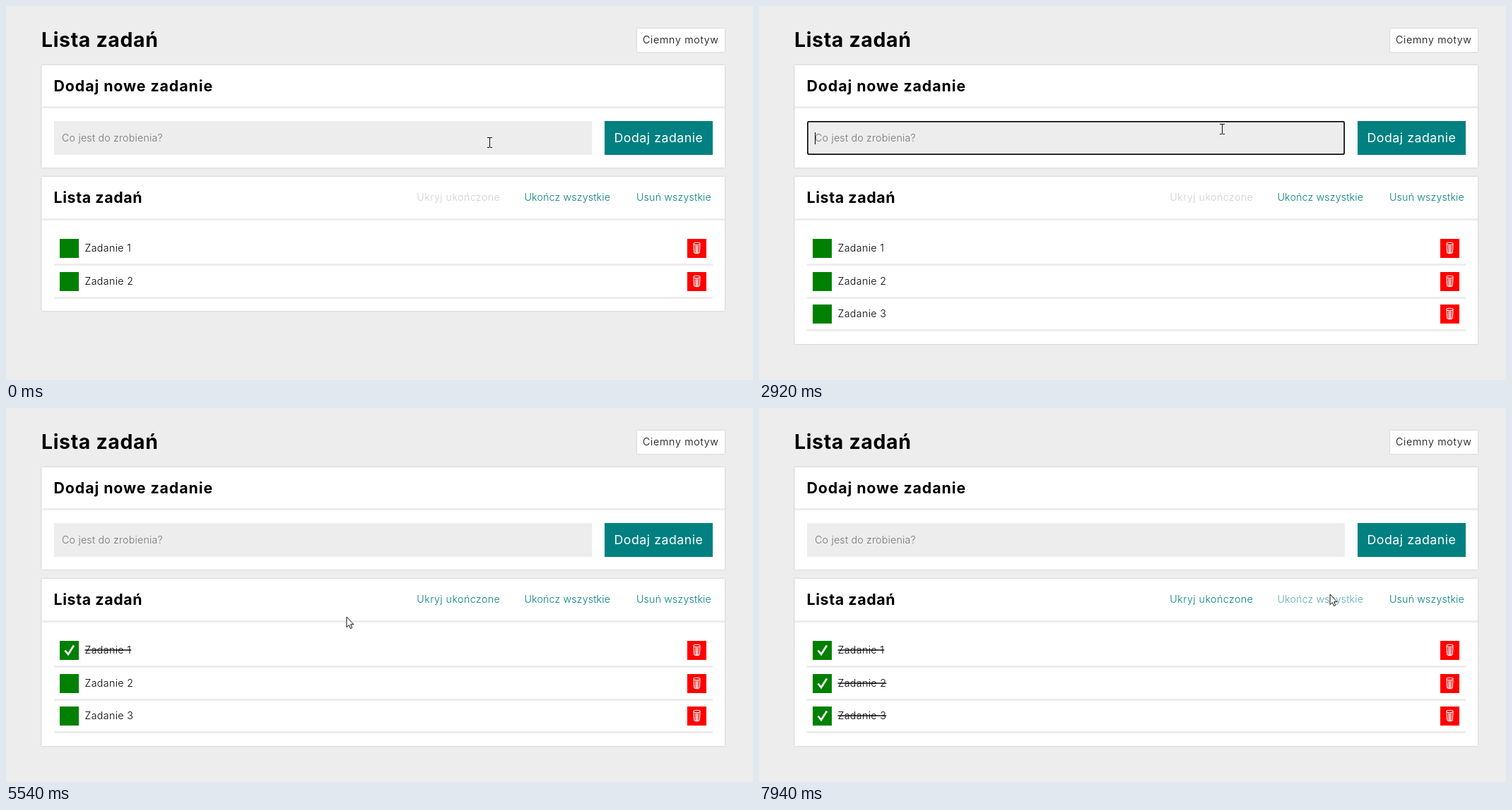
Animation, 1057 px wide and 530 px high, one loop 7.99 s. Source, as an HTML page:

```html
<!DOCTYPE html>
<html lang="pl">
<head>
<meta charset="utf-8">
<title>Lista zadań</title>
<style>
  html, body { margin: 0; width: 100%; height: 100%; overflow: hidden; background: #ededed; }
  svg { display: block; width: 100%; height: 100%; }
  text { font: 350 14.22px Inter, "Open Sans", sans-serif; letter-spacing: .35px; white-space: pre; }
  .h1 { font-size: 28.44px; font-weight: 700; letter-spacing: .65px; }
  .h2 { font-size: 21.33px; font-weight: 700; letter-spacing: .62px; }
  .wide { letter-spacing: .92px; }
  .button { font-size: 17.78px; font-weight: 400; letter-spacing: .5px; fill: #fff; }
  .theme { letter-spacing: .7px; }
  .hint { fill: #757575; letter-spacing: .2px; }
  .link { fill: teal; letter-spacing: .16px; }
  #hide { letter-spacing: .45px; text-anchor: end; }
  .panel { fill: #fff; filter: drop-shadow(0 0 1.3px #0003); }
  .soft { fill: #ededed; }
  .focus { fill: none; stroke: #101010; stroke-width: 1.75; }
  .done text { text-decoration: line-through; }
  .tick { visibility: hidden; fill: none; stroke: #fff; stroke-width: 2.7; }
  .done .tick { visibility: visible; }
  .bin { fill: none; stroke: #fff; stroke-width: 1.1; }
  .cursor { fill: #fff; stroke: #111; stroke-width: 1; stroke-linejoin: round; }
  #beam { fill: none; shape-rendering: crispEdges; }
</style>
</head>
<body>
<svg viewBox="0 0 1057 530">
  <defs>
    <g id="bin">
      <rect width="27" height="27" fill="red"/>
      <g class="bin">
        <ellipse cx="13.5" cy="7" rx="4.7" ry="1.7"/>
        <path d="M9 8.2L9.8 19.6Q13.5 21.8 17.2 19.6L18 8.2M11.7 9.5L12 20M13.5 9.5V20.3M15.3 9.5L15 20"/>
      </g>
    </g>
  </defs>

  <text class="h1" x="50" y="58">Lista zadań</text>
  <rect class="panel" x="893" y="32" width="124" height="33"/>
  <text class="theme" x="901" y="53">Ciemny motyw</text>

  <rect class="panel" x="50.5" y="84" width="966.5" height="145"/>
  <rect class="soft" x="50.5" y="142" width="966.5" height="3"/>
  <text class="h2 wide" x="67.5" y="121">Dodaj nowe zadanie</text>
  <rect class="soft" x="68" y="163" width="761" height="48"/>
  <text class="hint" id="hint" x="79" y="192">Co jest do zrobienia?</text>
  <text id="typed" x="79" y="192"></text>
  <rect id="caret" y="179" width="1" height="17"/>
  <rect class="focus" id="inputFocus" x="68.9" y="163.9" width="759.2" height="46.2" rx="2"/>
  <rect x="847" y="163" width="153" height="48" fill="teal"/>
  <text class="button" x="860.5" y="193">Dodaj zadanie</text>

  <rect class="panel" id="listPanel" x="50.5" y="242" width="966.5"/>
  <rect class="soft" x="50.5" y="301" width="966.5" height="3"/>
  <text class="h2" x="67.5" y="279">Lista zadań</text>
  <text class="link" id="hide" x="699.3" y="275.5"></text>
  <text class="link" id="finish" x="733.5" y="275.5">Ukończ wszystkie</text>
  <text class="link" x="892" y="275.5">Usuń wszystkie</text>
  <g id="rows"></g>
  <rect class="focus" id="boxFocus" x="76" y="330" width="27" height="27" rx="2"/>
  <rect class="focus" id="hideFocus" y="242" height="59" rx="2"/>
  <rect class="focus" id="finishFocus" x="717" y="242" width="158" height="59" rx="2"/>

  <g id="pointer">
    <circle id="flash" r="11" fill="#ffee20"/>
    <path class="cursor" id="beam" d="M-3 -7H0M1 -7H4M-3 7H0M1 7H4M.5 -7V7"/>
    <path class="cursor" id="arrow" d="M0 0V14.6L3.4 11.5L5.5 16.6L7.8 15.6L5.7 10.7H10Z"/>
    <g class="cursor" id="hand">
      <path d="M-1.8 12.5V2Q-1.8 .4 -.2 .4T1.4 2V7.4Q3.4 6.2 4.1 8Q6 7.2 6.7 9Q9 8.6 9 11V14.5Q9 17 7.4 18.8V20.8H-.4V18.8L-4.7 13Q-5.6 11.2 -4.1 10.7Q-3 10.5 -1.8 12.5Z"/>
      <path d="M1.4 7.5V11.5M4.1 8V11.5M6.7 9V11.8"/>
    </g>
  </g>
</svg>

<script>
const LOOP = 7990;
const TICK = 50;
const ROW = 46.67;
const $ = id => document.getElementById(id);
const show = (id, on) => $(id).style.visibility = on ? "visible" : "hidden";
const within = (t, a, b) => t >= a && t < b;
const set = (el, attrs) => { for (const k in attrs) el.setAttribute(k, attrs[k]); };

const GRAY = [206, 206, 206], TEAL = [0, 128, 128], HOVER = [16, 148, 162], ACTIVE = [10, 182, 184];
const GREEN = [0, 128, 0], LIT = [0, 148, 0], PRESSED = [0, 166, 0];

const hideColors = [[4890, GRAY], [5190, TEAL], [5750, TEAL], [5950, HOVER], [6150, HOVER], [6230, ACTIVE],
  [6310, ACTIVE], [6450, HOVER], [6640, HOVER], [6690, ACTIVE], [6740, HOVER], [7350, HOVER], [7530, TEAL]];
const finishColors = [[7380, TEAL], [7530, HOVER], [7860, HOVER], [8060, GRAY]];
const boxColors = [[4560, GREEN], [4660, LIT], [4740, LIT], [4790, PRESSED], [4890, LIT], [5090, GREEN]];

// start, end, destination
const moves = [[560, 700, 655, 174], [3910, 4660, 87, 345], [4980, 5950, 672, 273], [7260, 7530, 808, 264]];
const START = [684, 193];
// mouse down, mouse up
const clicks = [[150, 215], [4740, 4840], [6150, 6230], [6640, 6690], [7810, 7860]];
const TEXT = "Zadanie 3";
const keys = [980, 1460, 1670, 1770, 1950, 2000, 2200, 2380, 2690];
const SUBMIT = 2920;

function color(t, stops) {
  const i = stops.findIndex(s => s[0] > t);
  if (i === 0) return `rgb(${stops[0][1]})`;
  if (i < 0) return `rgb(${stops[stops.length - 1][1]})`;
  const [t0, a] = stops[i - 1], [t1, b] = stops[i];
  const k = (t - t0) / (t1 - t0);
  return `rgb(${a.map((v, n) => Math.round(v + (b[n] - v) * k))})`;
}

function cursorAt(t) {
  let [x, y] = START;
  for (const [t0, t1, tx, ty] of moves) {
    if (t < t0) break;
    const held = t0 + (Math.floor((t - t0) / TICK) + 1) * TICK;
    const k = Math.min(1, (held - t0) / (t1 - t0));
    const ease = k * k * (3 - 2 * k);
    x += (tx - x) * ease;
    y += (ty - y) * ease;
  }
  return [x, y];
}

function cursorKind(x, y, t) {
  const over = (l, r, top, bottom) => x > l && x < r && y > top && y < bottom;
  if (over(68, 829, 163, 211) || over(112, 178, 333, 352)) return "beam";
  if (over(76, 103, 330, 357) || over(562, 716, 242, 302)) return "hand";
  if (over(716, 875, 242, 302) && t < 7860) return "hand";
  return "arrow";
}

function flashAlpha(t) {
  for (const [down, up] of clicks)
    if (within(t, down, up + 80)) return .68 * Math.min(1, 1 - (t - up) / 160);
  return 0;
}

const rows = [1, 2, 3].map(n => {
  const row = document.createElementNS("http://www.w3.org/2000/svg", "g");
  row.innerHTML = `<rect class="box" x="76" y="330" width="27" height="27" fill="green"/>
    <path class="tick" d="M83.5 343.5L88 349L96 336.5"/>
    <text x="111.5" y="347.7">Zadanie ${n}</text>
    <use href="#bin" x="964" y="330"/>
    <rect class="soft" x="68" y="365" width="932" height="3"/>`;
  $("rows").append(row);
  return row;
});

function drawInput(t) {
  const focused = within(t, 150, 4740);
  const events = [150, ...keys, SUBMIT].filter(k => k <= t);
  const count = t < SUBMIT ? keys.filter(k => k <= t).length : 0;
  const typed = $("typed");
  typed.textContent = TEXT.slice(0, count);
  show("hint", !count);
  show("inputFocus", focused);
  show("caret", focused && (t - events[events.length - 1]) % 1000 < 510);
  $("caret").setAttribute("x", 79 + (count ? Math.round(typed.getComputedTextLength()) : 0));
}

function drawList(t) {
  const hidden = within(t, 6310, 6740);
  const total = t < SUBMIT ? 2 : 3;
  let slot = 0;
  rows.forEach((row, i) => {
    const done = t >= 7860 || (i === 0 && t >= 4890);
    const visible = i < total && !(hidden && done);
    row.style.display = visible ? "" : "none";
    row.classList.toggle("done", done);
    if (visible) row.setAttribute("transform", `translate(0 ${Math.round(slot++ * ROW)})`);
  });
  rows[0].querySelector(".box").setAttribute("fill", color(t, boxColors));
  $("listPanel").setAttribute("height", Math.round(97 + slot * ROW));

  $("hide").textContent = (hidden ? "Pokaż" : "Ukryj") + " ukończone";
  $("hide").style.fill = color(t, hideColors);
  $("finish").style.fill = color(t, finishColors);
  const left = hidden ? 556 : 563;
  set($("hideFocus"), { x: left, width: 716 - left });
  show("boxFocus", within(t, 4740, 4890));
  show("hideFocus", within(t, 6150, 7530));
  show("finishFocus", within(t, 7810, 7860));
}

function drawPointer(t) {
  const [x, y] = cursorAt(t);
  const kind = cursorKind(x, y, t);
  for (const id of ["beam", "arrow", "hand"]) show(id, id === kind);
  $("pointer").setAttribute("transform", `translate(${Math.round(x)} ${Math.round(y)})`);
  $("flash").setAttribute("opacity", flashAlpha(t));
}

const begin = performance.now();
function frame() {
  const t = (performance.now() - begin) % LOOP;
  drawInput(t);
  drawList(t);
  drawPointer(t);
  requestAnimationFrame(frame);
}
frame();
</script>
</body>
</html>
```
